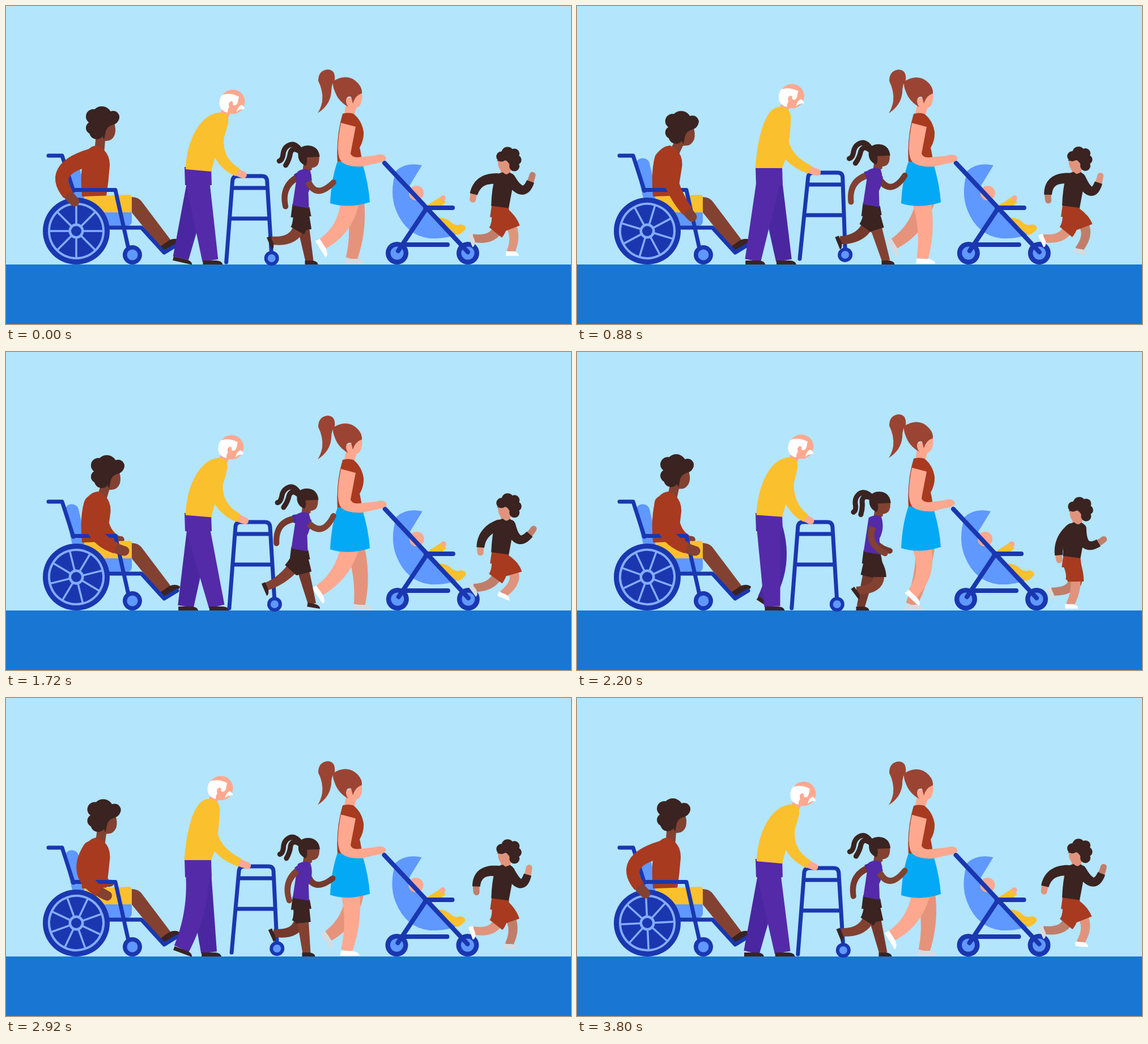
An HTML page for the animation above (3.84 s loop, 997 px wide and 561 px high).

```html
<!DOCTYPE html>
<html lang="en">
<head>
<meta charset="utf-8">
<title>Parade</title>
<style>
html, body { margin: 0; width: 100%; height: 100%; overflow: hidden; background: #b3e5fc; }
svg { display: block; width: 997px; height: 561px; }
.bar { fill: none; stroke: #1a37b0; stroke-width: 7; stroke-linecap: round; stroke-linejoin: round; }
.navy { fill: #1a37b0; } .blue { fill: #5f98ff; } .rust { fill: #a83a20; } .gold { fill: #fbc02d; }
.dark { fill: #3a2320; } .brown { fill: #834132; } .umber { fill: #74392c; }
.peach { fill: #ffa890; } .clay { fill: #e6937b; } .tan { fill: #e0947d; } .tan2 { fill: #c07e6a; }
.violet { fill: #542aa8; } .violet2 { fill: #4a27a0; } .white { fill: #fff; } .grey { fill: #d5dce0; }
.auburn { fill: #9c4433; }
</style>
</head>
<body>
<svg viewBox="0 0 997 561">
  <rect width="997" height="561" fill="#b3e5fc"/>
  <rect y="456" width="997" height="105" fill="#1976d2"/>

  <g id="chair">
    <path d="M116 281L128 332" fill="none" stroke="#5f98ff" stroke-width="25" stroke-linecap="round"/>
    <path class="bar" d="M75 264H99L119 326"/>
    <g id="chairFar"><path class="brown"/><path class="rust"/></g>
    <path id="chairNeck" fill="none" stroke="#834132" stroke-width="17"/>
    <g id="chairHead">
      <path class="brown" d="M164 204H190Q195 216 192 227Q187 239 176 238L164 240Z"/>
      <g class="dark">
        <circle cx="169" cy="195" r="18"/><circle cx="154" cy="195" r="13"/><circle cx="189" cy="196" r="11"/>
        <circle cx="152" cy="215" r="11"/><circle cx="160" cy="222" r="13"/>
        <path d="M150 200H191L200 193Q200 207 188 210Q179 212 176 221L173 236L168 224Z"/>
      </g>
    </g>
    <path id="chairTorso" class="rust"/>
    <rect class="blue" x="145" y="360" width="77" height="28" rx="8"/>
    <path class="brown" d="M220 337Q234 336 241 347L290 412L272 426L220 362Z"/>
    <path class="dark" d="M271 425L288 413Q300 408 307 414Q307 418 300 420L279 431Z"/>
    <path class="gold" d="M137 336L217 333Q222 333 222 338V364H165Q152 350 137 336Z"/>
    <path class="bar" d="M118 324.500H193L217 432M170 391H239L279 435L302 421"/>
    <circle class="navy" cx="223" cy="439" r="17"/><circle class="blue" cx="223" cy="439" r="9.500"/>
    <circle class="navy" cx="124" cy="397" r="59"/>
    <g id="spokes" fill="none" stroke="#84adff" stroke-width="4">
      <circle cx="124" cy="397" r="48"/><path id="rays" stroke-width="3.500"/>
    </g>
    <circle cx="124" cy="397" r="13.500" fill="#84adff"/><circle class="navy" cx="124" cy="397" r="9"/>
    <g id="chairNear"><path class="brown"/><path class="rust"/></g>
  </g>

  <g id="manFarLeg"><path class="violet2"/><path/><path class="dark" d="M-13 0H11Q21 1 22 7H-13Z"/></g>
  <g id="manNearLeg"><path class="violet"/><path/><path class="dark" d="M-13 0H11Q21 1 22 7H-13Z"/></g>
  <path class="violet" d="M315 284H362L363 316H316Z"/>
  <g id="walker">
    <path class="bar" d="M389 452L400 308Q401 300 409 300H452Q460 300 461 308L469 440M399 321H461M395 375H464"/>
    <circle class="navy" cx="469" cy="445" r="13"/><circle class="blue" cx="469" cy="445" r="7"/>
  </g>
  <path id="manNeck" fill="none" stroke="#ffa890" stroke-width="16"/>
  <path id="manTorso" class="gold"/>
  <g id="manArm"><path class="peach"/><path class="gold"/></g>
  <g id="manHead">
    <circle class="peach" cx="400" cy="169" r="21.500"/>
    <path class="white" d="M381 157Q395 152 411 160L409 170Q406 178 400 174Q402 168 397 168Q391 171 394 178Q391 182 391 188Q380 186 377 176Q375 165 381 157Z"/>
    <path class="white" d="M407 187Q409 177 416 174Q422 178 421 182Q413 181 407 187Z"/>
  </g>

  <g id="momFarLeg"><path class="clay"/><path/><path class="grey" d="M-10 0H10Q23 2 23 9H-11Z"/></g>
  <g id="momNearLeg"><path class="peach"/><path/><path class="white" d="M-10 0H10Q23 2 23 9H-11Z"/></g>

  <g id="stroller">
    <path class="blue" d="M734 281Q705 275 688 291Q676 330 688 360Q706 405 748 410Q782 411 800 400L760 375L712 317Z"/>
    <circle class="peach" cx="724" cy="330" r="13"/>
    <path class="gold" d="M741 353L768 336L776 346L768 353Z"/>
    <circle class="peach" cx="771" cy="339" r="5"/>
    <path class="gold" d="M758 373Q778 372 788 384Q796 388 802 385Q811 386 811 393Q802 404 795 404Z"/>
    <circle class="navy" cx="690" cy="436" r="20"/><circle class="blue" cx="690" cy="436" r="11.500"/>
    <circle class="navy" cx="815" cy="436" r="20"/><circle class="blue" cx="815" cy="436" r="11.500"/>
    <path class="bar" style="stroke-width:8" d="M668 277L815 434M692 432L740 360M740 356H788M706 421H779"/>
  </g>

  <g id="momBody">
    <path class="auburn" d="M580 131Q582 112 567 112Q551 114 551 132Q560 150 558 168Q556 180 550 189Q572 175 574 152Q574 138 580 131Z"/>
    <path class="peach" d="M601 170L620 174L615 191Q606 195 597 189Z"/>
    <path class="peach" d="M628 152Q630 168 624 176Q618 182 608 180L600 184V164Z"/>
    <path class="auburn" d="M577 133Q603 117 621 136Q629 145 628 154Q616 158 612 172L609 160Q601 158 600 167Q600 173 604 178Q586 168 580 150Q576 141 577 133Z"/>
    <path class="rust" d="M594 190Q604 187 613 190Q628 202 631 222Q632 236 624 250Q628 264 628 279L585 276Q582 230 594 190Z"/>
    <path d="M585 274L629 278Q640 315 642 346Q605 358 572 348Q574 305 585 274Z" fill="#03a9f4"/>
    <path id="momArm" class="peach"/>
  </g>

  <g id="girlFarArm"><path class="umber"/><path class="violet2"/></g>
  <g id="girlFarLeg"><path class="umber"/><path class="dark"/><path class="dark" d="M-8 -1H6Q15 1 15 6H-8Z"/></g>
  <g id="girlNearLeg"><path class="brown"/><path class="dark"/><path class="dark" d="M-8 -1H6Q15 1 15 6H-8Z"/></g>
  <g id="girlBody">
    <path id="girlTail" fill="none" stroke="#3a2320" stroke-width="9" stroke-linecap="round" d="M519 254Q509 240 498 247Q490 252 489 263Q487 272 482 273M519 258Q506 248 502 260Q500 271 493 281"/>
    <path class="brown" d="M526 276H540V290Q532 296 524 290Z"/>
    <path class="dark" d="M506 350L536 356L539 372L503 374Z"/>
    <path class="violet" d="M515 293Q527 286 537 291Q544 310 534 330L535 358L506 353Q511 320 515 293Z"/>
    <path class="brown" d="M528 264H553Q554 276 550 282Q544 288 534 286Z"/>
    <path class="dark" d="M516 262Q517 247 534 247Q552 248 554 267L531 268Q533 278 529 283Q515 277 516 262Z"/>
  </g>
  <g id="girlNearArm"><path class="brown"/><path class="violet"/></g>

  <g id="boyFarArm"><path class="tan2"/><path class="dark"/></g>
  <g id="boyFarLeg"><path class="tan2"/><path class="rust"/><path class="grey" d="M-8 -2H6Q15 0 15 6H-8Z"/></g>
  <g id="boyNearLeg"><path class="tan"/><path class="rust"/><path class="white" d="M-8 -2H6Q15 0 15 6H-8Z"/></g>
  <g id="boyBody">
    <path class="rust" d="M857 350L887 355L889 372L854 372Z"/>
    <path class="tan" d="M873 284H890V296Q880 302 873 295Z"/>
    <path class="dark" d="M863 300Q872 290 888 293Q897 296 896 308L887 356L856 352Q857 322 863 300Z"/>
    <path class="tan" d="M868 272H894L890 291Q884 300 878 294Q867 287 868 272Z"/>
    <g class="dark">
      <circle cx="885" cy="259" r="11"/><circle cx="874" cy="265" r="9"/><circle cx="897" cy="260" r="9"/>
      <circle cx="901" cy="271" r="8.500"/><circle cx="897" cy="282" r="9"/>
      <path d="M866 273L880 260L904 268L892 287Q887 274 882 272Z"/>
    </g>
  </g>
  <g id="boyNearArm"><path class="tan"/><path class="dark"/></g>
</svg>
<script>
const $ = id => document.getElementById(id);
const LOOP = 3840, CYCLE = 1920, STEP = 960;
const { PI, sin, cos, hypot, sqrt, min, max } = Math;

const mod = (a, n) => ((a % n) + n) % n;
const mix = (a, b, u) => a + (b - a) * u;
const ramp = (t, from, to) => min(1, max(0, (t - from) / (to - from)));
const smooth = u => (1 - cos(PI * u)) / 2;
const wave = (t, period, peak = 0) => cos(2 * PI * (t - peak) / period);

const move = (id, x, y) => $(id).setAttribute('transform', `translate(${x} ${y})`);
const draw = (node, d) => node.setAttribute('d', d);

// Tapered outline along a curve from a through k to c, between parameters u0 and u1.
function limb(a, k, c, w0, w1, u0 = 0, u1 = 1, round = true) {
  const m = [0, 1].map(i => 2 * k[i] - (a[i] + c[i]) / 2);
  const left = [], right = [], steps = 14;
  for (let i = 0; i <= steps; i++) {
    const u = mix(u0, u1, i / steps), v = 1 - u;
    const p = [0, 1].map(j => v * v * a[j] + 2 * u * v * m[j] + u * u * c[j]);
    const d = [0, 1].map(j => v * (m[j] - a[j]) + u * (c[j] - m[j]));
    const s = mix(w0, w1, u) / 2 / (hypot(d[0], d[1]) || 1);
    left.push([p[0] - d[1] * s, p[1] + d[0] * s]);
    right.unshift([p[0] + d[1] * s, p[1] - d[0] * s]);
  }
  const xy = p => p[0].toFixed(2) + ' ' + p[1].toFixed(2);
  const arc = u => `A${mix(w0, w1, u) / 2} ${mix(w0, w1, u) / 2} 0 0 0 `;
  return 'M' + left.map(xy).join('L') + (round ? arc(u1) : 'L')
    + right.map(xy).join('L') + arc(u0) + xy(left[0]) + 'Z';
}

// Middle joint of a two-part limb; side 1 bends forward, -1 backward.
function joint(a, c, len, side, amount = 1) {
  const dx = c[0] - a[0], dy = c[1] - a[1], d = hypot(dx, dy) || 1;
  const b = side * amount * sqrt(max(0, len * len - d * d / 4)) / d;
  return [(a[0] + c[0]) / 2 + dy * b, (a[1] + c[1]) / 2 - dx * b];
}

// The foot slides back on the ground, then swings forward in an arc.
function step(t, g) {
  const p = mod(t - g.land, CYCLE);
  if (p < g.stance) return [mix(g.front, g.back, p / g.stance), g.ground, 0];
  const s = (p - g.stance) / (CYCLE - g.stance), k = sin(PI * s ** .7);
  return [mix(g.back, g.front, smooth(s)) - g.kick * k ** (g.sharp || 1), g.ground - g.lift * k, g.turn * k];
}

function leg(id, hip, [x, y, turn], o) {
  const [skin, cloth, shoe] = $(id).children;
  const foot = [x, y], knee = joint(hip, foot, o.len, 1, o.bend);
  draw(skin, limb(hip, knee, foot, o.w[0], o.w[1], 0, 1, false));
  if (o.shorts) draw(cloth, limb(hip, knee, foot, o.shorts[0], o.shorts[1], 0, o.shorts[2], false));
  shoe.setAttribute('transform', `translate(${x} ${y}) rotate(${turn})`);
}

function arm(id, a, k, c, w0, w1, sleeve) {
  const [skin, cloth] = $(id).children;
  draw(skin, limb(a, k, c, w0 - 3, w1 - 2, max(0, sleeve - .1)));
  draw(cloth, limb(a, k, c, w0, w1, 0, sleeve, false));
}

// Point at a distance from the shoulder; angle in degrees, forward from straight down.
function hang([x, y], angle, len) {
  const a = angle * PI / 180;
  return [x + len * sin(a), y + len * cos(a)];
}

// Elbow, hand and far hand
const BACK = [100, 298, 121, 345, 150, 318];
const PUSH = [172, 325, 203, 372, 186, 348];
const LAP = [160, 321, 209, 351, 203, 331];

function chairScene(t) {
  const lean = t < 450 ? smooth(t / 450) : (1 - ramp(t, 450, LOOP)) ** 1.500;
  const hx = 18 * lean, hy = 10 * lean, s = hx * .28;
  const pushed = smooth(ramp(t, 0, 420)), rested = smooth(ramp(t, 900, 1700)), back = smooth(ramp(t, 2400, 3700));
  const [ex, ey, x, y, fx, fy] = BACK.map((b, i) => mix(mix(mix(b, PUSH[i], pushed), LAP[i], rested), b, back));
  move('chairHead', hx, hy);
  draw($('chairNeck'), `M${167 + hx} ${230 + hy}L${165 + hx * .5} ${255 + hy * .3}`);
  draw($('chairTorso'), `M134 336Q130 290 138 264Q${146 + s} 247 ${160 + s} 246Q${184 + s * .7} 256 ${183 + s * .6} 282Q181 310 177 336Z`);
  arm('chairFar', [166, 270], [(166 + fx) / 2 - 6, 315], [fx, fy], 20, 14, .86);
  arm('chairNear', [149 + s * 1.500, 267 + s * .4], [ex, ey], [x, y], 30, 19, .88);
  $('spokes').setAttribute('transform', `rotate(${270 * t / LOOP} 124 397)`);
}

const manGait = { land: 1700, stance: 1140, front: 373, back: 308, ground: 449, kick: 0, lift: 11, turn: 34 };
const manLegs = { len: 70, bend: .6, w: [42, 28] };

function manScene(t) {
  const hx = 10.500 * (wave(t, CYCLE) - 1), hy = hx * .48;
  // The walker is lifted ahead, then dragged back.
  const p = mod(t - 300, CYCLE), ahead = p / 800;
  const up = p < 800 ? sin(PI * ahead) : 0;
  const top = p < 800 ? mix(-11, 12, smooth(ahead)) : 12 - 23 * ((p - 800) / 1120) ** 2;
  const base = top - 5 * up, lean = (top - base) / 146;
  $('walker').setAttribute('transform', `matrix(1 0 ${-lean} 1 ${base + lean * 446} ${-8 * up})`);

  leg('manFarLeg', [341, 308], step(t + STEP, manGait), manLegs);
  leg('manNearLeg', [338, 308], step(t, manGait), manLegs);
  move('manHead', hx, hy);
  draw($('manNeck'), `M${391 + hx} ${180 + hy}L${383 + hx} ${198 + hy}`);
  draw($('manTorso'), `M${317 + hx * .12} ${288 + hy * .2}C318 240 ${342 + hx * .6} ${190 + hy} ${377 + hx} ${188 + hy}`
    + `Q${394 + hx * .9} ${187 + hy} ${392 + hx * .7} ${206 + hy}Q${384 + hx * .4} 240 368 270L362 ${292 + hy * .6}Z`);
  arm('manArm', [374 + hx * .7, 216 + hy], [380 + hx * .35, 267 + hy * .6], [419 + top * .65, 298 - 6 * up], 26, 14, .9);
}

const momGait = { land: 740, stance: 640, front: 619, back: 574, ground: 446, kick: 33, sharp: 3, lift: 27, turn: 58 };
const momLegs = { len: 55, bend: .35, w: [33, 20] };

function momScene(t) {
  const c = wave(t, STEP, -140), s = 2.600 * (c - .6);
  const [farX, ...far] = step(t + STEP, momGait);
  leg('momFarLeg', [615, 342], [farX + 6, ...far], momLegs);
  leg('momNearLeg', [607, 342], step(t, momGait), momLegs);
  move('momBody', 0, 1.300 * (c - .7));
  move('stroller', s, 0);
  draw($('momArm'), `M591 206L617 213L608 260Q610 267 620 267L${650 + s} 264Q${668 + s} 258 ${671 + s} 269`
    + `Q${668 + s} 276 ${650 + s} 278L630 283Q604 285 592 275Q580 262 591 206Z`);
}

const girlGait = { land: 860, stance: 400, front: 548, back: 498, ground: 450, kick: 50, lift: 37, turn: 68 };
const girlLegs = { len: 40, w: [23, 14], shorts: [28, 25, .35] };

function girlScene(t) {
  const by = 4.300 * wave(t, STEP, 150) - 3.500, bx = by * .4, far = t + STEP;
  const hip = [521 + bx, 368 + by];
  leg('girlFarLeg', hip, step(far, girlGait), girlLegs);
  leg('girlNearLeg', hip, step(t, girlGait), girlLegs);
  move('girlBody', bx, by);
  $('girlTail').setAttribute('transform', `rotate(${-8 - 10 * wave(t, STEP, 330)} 518 258)`);
  for (const [id, time] of [['girlFarArm', far], ['girlNearArm', t]]) {
    const swing = wave(time, CYCLE, -220);
    const hand = hang([524, 300 + by], 24 + 71 * swing, 59 - 5 * swing);
    const top = [mix(524, hand[0], .1) + bx, 300 + by];
    arm(id, top, joint(top, hand, 33, -1), hand, 15, 12, .13);
  }
}

const boyGait = { land: 0, stance: 540, front: 890, back: 850, ground: 449, kick: 36, lift: 26, turn: 70 };
const boyLegs = { len: 38, w: [20, 14], shorts: [30, 27, .43] };

function boyScene(t) {
  const by = 4.500 - 4.500 * wave(t, STEP, -80), bx = by * .35, far = t + STEP;
  const hip = [872 + bx * .3, 366 + by * .9];
  const foot = time => {
    const [x, y, turn] = step(time, boyGait);
    return [x, y - 1.700 * (9 - by), turn];
  };
  leg('boyFarLeg', hip, foot(far), boyLegs);
  leg('boyNearLeg', hip, foot(t), boyLegs);
  move('boyBody', bx * .5, by);
  for (const [id, time, dx] of [['boyFarArm', far, 6], ['boyNearArm', t, 0]]) {
    const swing = wave(time, CYCLE, STEP);
    const hand = hang([878 + dx, 304 + by], 21 + 77 * swing, 55.500 - 10 * swing);
    const top = [mix(878, hand[0], .22), 304 + by];
    arm(id, top, joint(top, hand, 31, -1), hand, 19, 13, .87);
  }
}

let rays = '';
for (let i = 0; i < 8; i++) {
  const x = cos(i * PI / 4), y = sin(i * PI / 4);
  rays += `M${124 + 12 * x} ${397 + 12 * y}L${124 + 47 * x} ${397 + 47 * y}`;
}
draw($('rays'), rays);

function render(now) {
  const t = Math.floor(now % LOOP / 40) * 40;
  for (const scene of [chairScene, manScene, momScene, girlScene, boyScene]) scene(t);
}

const start = performance.now();
function tick() {
  render(performance.now() - start);
  requestAnimationFrame(tick);
}
tick();
</script>
</body>
</html>
```
